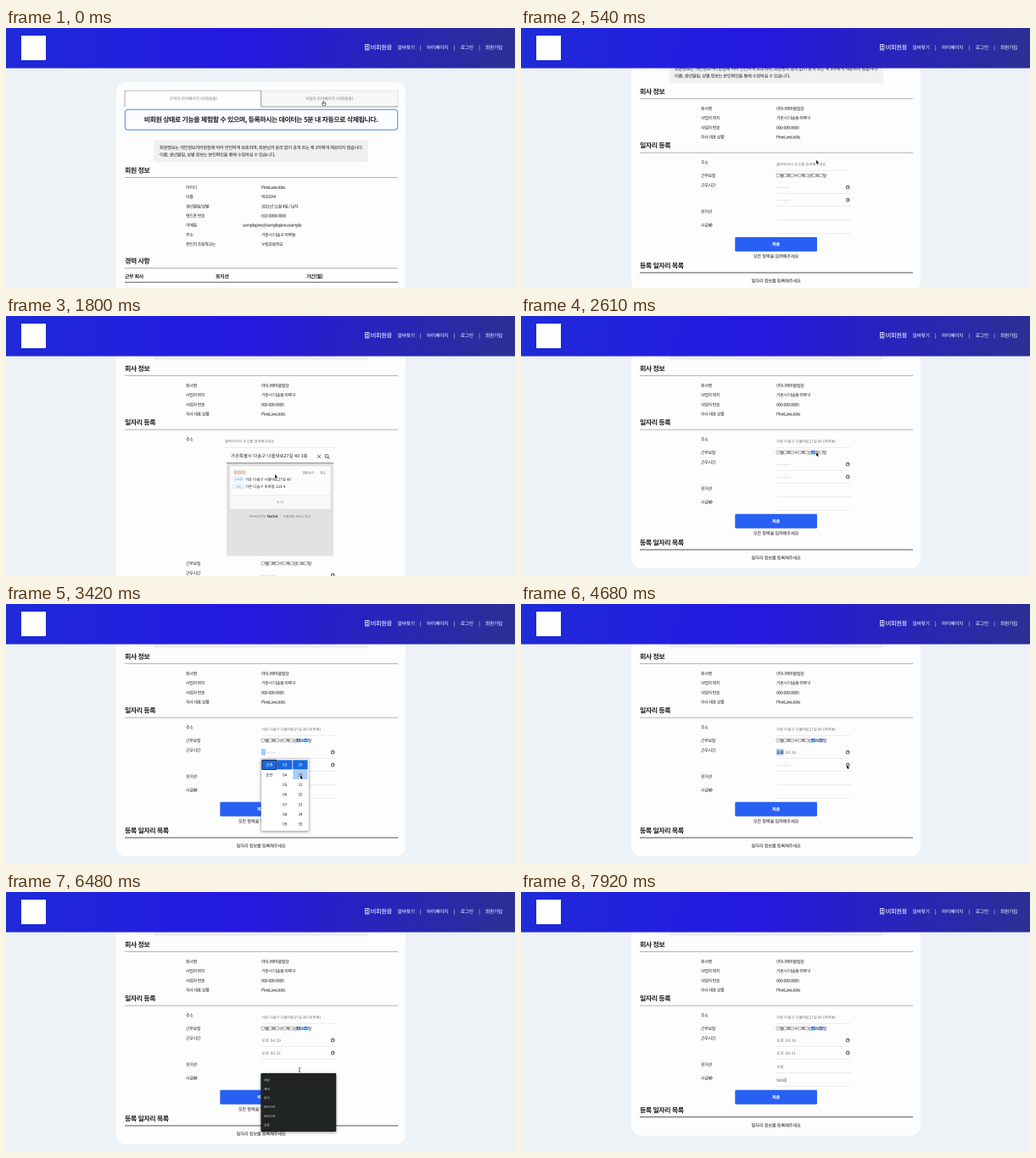
Write an HTML page with a canvas that moves like this. It is 600 px wide and 307 px high and loops after 8000 ms.

```html
<!DOCTYPE html>
<html lang="ko">
<head>
<meta charset="utf-8">
<title>마이페이지</title>
<style>
html, body { margin: 0; width: 100%; height: 100%; overflow: hidden; background: #edf2f6; }
canvas { display: block; width: 600px; height: 307px; }
</style>
</head>
<body>
<canvas id="stage"></canvas>
<script>
const W = 600, H = 307, LOOP = 8000, STEP = 90;
const canvas = document.getElementById('stage');
const ctx = canvas.getContext('2d');
const ratio = Math.max(2, window.devicePixelRatio || 1);
canvas.width = W * ratio;
canvas.height = H * ratio;

const FAMILY = '"Noto Sans CJK KR", "Noto Sans CJK", "Noto Sans", sans-serif';
const INK = '#222', SOFT = '#707070', BLUE = '#2860f4';
const MAX_SCROLL = 106;
const ADDRESS = '가온 다솜구 너울대로27길 40';

// Moments (ms) at which something in the page changes.
const AT = {
  company: 90, scroll: 225, scrolled: 710,
  search: 810, query: 1260, result: 1620, address: 2070,
  saturday: 2520, sunday: 2700,
  start: 3060, startHour: 3780, startDone: 4320,
  end: 4860, endHour: 5220, endMinute: 5580, endDone: 5850,
  position: 6300, positionDone: 6930,
  wage: 7290, firstDigit: 7470
};

// Pointer stops: time, x, y.
const POINTER = [
  [0, 374, 86.5], [180, 374, 86.5], [540, 348, 156], [760, 348, 155], [1000, 310, 165],
  [1500, 310, 165], [1800, 317, 187], [2050, 317, 189], [2430, 345, 161], [2560, 345, 161],
  [2680, 353, 161], [2780, 353, 161], [3000, 385, 175], [3120, 385, 175], [3420, 347, 202],
  [3690, 329, 202], [3900, 329, 203], [4300, 398, 215], [4680, 384, 190], [4900, 384, 190],
  [5150, 329, 240], [5300, 329, 240], [5500, 347, 228], [5650, 347, 228], [5900, 398, 215],
  [6250, 346, 207], [6480, 346, 210], [6840, 315, 222], [6960, 315, 222], [7250, 330, 222]
];

function text(s, x, y, size = 5.1, { color = INK, weight = 400, spacing = 0, align = 'left' } = {}) {
  ctx.font = `${weight} ${size}px ${FAMILY}`;
  ctx.letterSpacing = spacing + 'px';
  ctx.textRendering = 'geometricPrecision';
  ctx.textBaseline = 'middle';
  ctx.textAlign = align;
  ctx.fillStyle = color;
  ctx.fillText(s, x, y);
}

function box(x, y, w, h, fill, radius = 0, stroke, width = 0.6) {
  ctx.beginPath();
  ctx.roundRect(x, y, w, h, radius);
  if (fill) { ctx.fillStyle = fill; ctx.fill(); }
  if (stroke) { ctx.strokeStyle = stroke; ctx.lineWidth = width; ctx.stroke(); }
}

function path(points, color, width = 0.6) {
  ctx.beginPath();
  points.forEach(([x, y]) => ctx.lineTo(x, y));
  ctx.strokeStyle = color;
  ctx.lineWidth = width;
  ctx.stroke();
}

function circle(x, y, r, color, width = 0.7) {
  ctx.beginPath();
  ctx.arc(x, y, r, 0, 7);
  ctx.strokeStyle = color;
  ctx.lineWidth = width;
  ctx.stroke();
}

const rule = (y, color = '#999', width = 0.8, x1 = 140, x2 = 462) =>
  path([[x1, y], [x2, y]], color, width);
const cell = (s, x, y) => text(s, x, y, 5.1, { spacing: -0.45 });
const note = (s, y) => text(s, 300.5, y, 5.36, { spacing: -0.3, align: 'center' });
const strong = (s, x, y, size = 8, align = 'left') =>
  text(s, x, y, size, { weight: 700, spacing: -size * 0.06, align });

function section(title, y) {
  strong(title, 140, y);
  rule(y + 8.6);
}

function rows(list, y) {
  list.forEach(([label, value, x = 301], i) => {
    cell(label, 212, y + i * 11.2);
    cell(value, x, y + i * 11.2);
  });
}

function pointerAt(t) {
  const i = POINTER.findIndex(stop => stop[0] > t);
  if (i < 0) return POINTER[POINTER.length - 1].slice(1);
  const [t0, x0, y0] = POINTER[i - 1], [t1, x1, y1] = POINTER[i];
  const u = (t - t0) / (t1 - t0), k = u * u * (3 - 2 * u);
  return [x0 + (x1 - x0) * k, y0 + (y1 - y0) * k];
}

function header() {
  const g = ctx.createLinearGradient(0, 0, W, 60);
  g.addColorStop(0, '#1f2bd8');
  g.addColorStop(0.45, '#2419e2');
  g.addColorStop(1, '#2b3194');
  ctx.fillStyle = g;
  ctx.fillRect(0, 0, W, 47.5);
  box(18, 9, 29, 29, '#fff');
  const white = { color: '#fff', weight: 500, spacing: -0.3 };
  box(423.4, 19.4, 4.6, 6.6, null, 0.6, '#fff', 0.7);
  circle(425.7, 21.8, 0.8, '#fff');
  path([[424.4, 24.4], [427, 24.4]], '#fff', 0.8);
  text('비회원용', 429.7, 22.7, 7.2, white);
  [['알바찾기', 461.5], ['|', 488], ['마이페이지', 496], ['|', 527.5],
   ['로그인', 535.7], ['|', 557.3], ['회원가입', 565]].forEach(([s, x]) => text(s, x, 22.8, 5.8, white));
}

// Tabs, banner and privacy notice shared by both pages.
function pageTop(company) {
  const active = company ? 301 : 140, other = company ? 140 : 301;
  box(other, 74, 161, 19, '#f6f7f7', 0, '#ccc');
  box(active, 74, 161, 19, '#fdfdfd');
  path([[active, 93], [active, 74], [active + 160.5, 74], [active + 160.5, 93]], '#777');
  path([[other, 93], [other + 161, 93]], '#888', 0.8);
  const tab = { color: '#777', align: 'center' };
  text('구직자 마이페이지 (비회원용)', 221, 83, 4.6, tab);
  text('사업자 마이페이지 (비회원용)', 381, 83, 4.6, tab);
  box(140.3, 96.3, 321.4, 24, '#fafcff', 3.5, '#4a86e8', 1);
  strong('비회원 상태로 기능을 체험할 수 있으며, 등록하시는 데이터는 5분 내 자동으로 삭제됩니다.', 300.5, 108, 8, 'center');
  box(174.5, 132, 252.5, 26.2, '#f0f0f0');
  const info = { spacing: -0.3 };
  text('회원정보는 개인정보처리방침에 따라 안전하게 보호되며, 회원님의 동의 없이 공개 또는 제 3자에게 제공되지 않습니다.', 181, 141, 5.3, info);
  text('이름, 생년월일, 성별 정보는 본인확인을 통해 수정하실 수 있습니다.', 181, 149.3, 5.3, info);
}

function memberPage() {
  box(130, 64, 341, 300, '#fdfdfd', 12);
  pageTop(false);
  section('회원 정보', 168);
  rows([
    ['아이디', 'PineLaneJobs'], ['이름', '박모모씨'], ['생년월일/성별', '2021년 11월 4일 / 남자'],
    ['핸드폰 번호', '010-0000-0000'], ['이메일', 'samplepine@samplepine.example', 279],
    ['주소', '가온시 다솜구 마루동'], ['본인의 초등학교는', '누빔초등학교']
  ], 188);
  section('경력 사항', 275);
  ['근무 회사', '포지션', '기간(월)'].forEach((s, i) => strong(s, 140 + 107 * i, 293, 6));
  rule(300.2, '#444', 0.9);
  cell('나래식당', 140, 309);
  cell('서빙', 247, 309);
}

function checkbox(x, y, checked) {
  box(x, y - 1.9, 3.8, 3.8, checked ? '#1371ea' : '#fff', 0.6, checked ? '#1371ea' : '#666', 0.5);
  if (checked) path([[x + 0.8, y], [x + 1.6, y + 0.9], [x + 3, y - 1]], '#fff', 0.7);
}

function timeField(y, value, focused) {
  if (focused) box(300.8, y - 4, value ? 8.6 : 5.2, 7.6, '#a9cdf8');
  text(value || '-- --:--', 301.3, y, 4.6, { color: focused && !value ? '#2b6fd6' : SOFT, spacing: value ? 0.2 : 0.6 });
  if (focused && value) text('오후', 301.3, y, 4.6, { spacing: 0.2 });
  circle(385.2, y, 1.9, '#222');
  path([[385.2, y - 1.2], [385.2, y], [386.2, y + 0.4]], '#222', 0.5);
  rule(y + 7.2, '#e2e2e2', 0.6, 301, 389);
}

function popup(x, y, w, h, fill, radius) {
  ctx.save();
  ctx.shadowColor = 'rgba(0,0,0,.4)';
  ctx.shadowBlur = 3 * ratio;
  ctx.shadowOffsetY = ratio;
  box(x, y, w, h, fill, radius);
  ctx.restore();
}

function timePicker(y, hour, minute, [px, py]) {
  const rowHeight = 11.65, two = n => String(n).padStart(2, '0');
  popup(300.7, y, 56.4, 85.5, '#fff', 1);
  box(300.7, y, 56.4, 85.5, null, 1, '#aaa', 0.4);
  [[301.8, ['오후', '오전']],
   [320, Array.from({ length: 7 }, (_, i) => two((hour + i - 1) % 12 + 1))],
   [338.2, Array.from({ length: 7 }, (_, i) => two((minute + i) % 60))]].forEach(([x, items], column) => {
    items.forEach((s, i) => {
      const top = y + 1.7 + i * rowHeight;
      const hover = px >= x && px < x + 17.5 && py >= top && py < top + rowHeight;
      if (i === 0) box(x, top, 17.4, 11.2, '#1a67e0', 0.8, column === 0 ? '#111' : null, 0.9);
      else if (hover) box(x, top, 17.4, 11.2, '#a9cdf8', 0.8);
      text(s, x + 8.7, top + 5.7, 4.6, { color: i ? INK : '#fff', align: 'center', weight: i ? 400 : 500 });
    });
  });
}

function addressSearch(t) {
  box(260, 156, 126, 127.5, '#e0e3e1');
  box(260, 156, 126, 17.5, '#fdfdfd');
  rule(173.7, '#777', 0.8, 260, 386);
  if (t >= AT.query) {
    text('가온특별시 다솜구 너울대로27길 40 3층', 265, 165, 5.4);
    path([[367, 163.8], [371, 167.8]], '#444');
    path([[371, 163.8], [367, 167.8]], '#444');
  }
  circle(378, 165.3, 2, '#333');
  path([[379.5, 166.8], [381.2, 168.5]], '#333', 0.8);
  if (t >= AT.result) {
    box(263.8, 177, 119, 51, '#fcfcfb', 0, '#d2d5d3', 0.4);
    box(268, 181.5, 15, 6.2, '#f3efe8');
    text('00000', 268.5, 184.6, 5, { color: '#df7256' });
    text('영문보기', 349.5, 185.2, 3.8, { color: '#555' });
    text('|', 366.5, 185, 3.4, { color: '#ccc' });
    text('지도', 370, 185.2, 3.8, { color: '#555' });
    [['도로명', ADDRESS, 192.6], ['지번', '가온 다솜구 마루동 123-4', 201.5]].forEach(([kind, place, y]) => {
      box(267.8, y - 2.7, 12.6, 5.6, '#f0f6fd', 0.6, '#c8dcf2', 0.4);
      text(kind, 274.1, y + 0.1, 3.2, { color: '#338be0', align: 'center' });
      text(place, 282, y, 4.4);
    });
    box(264, 211.3, 118.6, 16.5, '#f7f8f7');
    rule(211.3, '#e2e4e3', 0.5, 264, 382.6);
    text('1 / 1', 323.2, 219.4, 4, { color: '#444', align: 'center' });
  }
  text('Powered by', 287, 236.4, 3.5, { color: '#666' });
  text('torvo', 308, 236.2, 4.6, { weight: 700, color: '#333' });
  text('|', 323, 236.2, 3.4, { color: '#bbb' });
  text('우편번호 서비스 안내', 327, 236.4, 3.6, { color: '#666' });
}

function form(t, pointer) {
  cell('근무요일', 212, 161);
  [...'월화수목금토일'].forEach((day, i) => {
    const x = 301 + i * 8.43;
    checkbox(x, 161, i === 5 && t >= AT.saturday || i === 6 && t >= AT.sunday);
    text(day, x + 4, 161, 5);
  });
  cell('근무시간', 212, 172.5);
  timeField(175, t >= AT.startHour && '오후 04:29', t >= AT.start && t < AT.end);
  timeField(190, t >= AT.endHour && (t >= AT.endMinute ? '오후 06:31' : '오후 06:29'), t >= AT.end && t < AT.position);
  cell('포지션', 212, 203.6);
  if (t >= AT.positionDone) text('서빙', 301.3, 206, 4.6, { color: SOFT });
  rule(213.4, '#e2e2e2', 0.6, 301, 389);
  cell('시급(₩)', 212, 219.5);
  const wage = t < AT.firstDigit ? '' : '9000'.slice(0, 1 + Math.floor((t - AT.firstDigit) / STEP));
  text(wage, 301.3, 222, 4.6, { color: '#555' });
  if (t >= AT.wage) {
    const x = 301.8 + ctx.measureText(wage).width;
    path([[x, 219.4], [x, 224.6]], '#222', 0.5);
  }
  rule(229.5, '#e2e2e2', 0.6, 301, 389);
  box(252.3, 233.8, 96.7, 17, BLUE, 1.5);
  text('제출', 300.6, 242.3, 5, { color: '#fff', weight: 700, align: 'center' });

  const lift = wage ? 10.2 : 0;
  if (!wage) note('모든 항목을 입력해주세요', 256.3);
  strong('등록 일자리 목록', 140, 267.5 - lift);
  rule(275.9 - lift, '#666', 1.1);
  note('일자리 정보를 등록해주세요', 285.6 - lift);

  if (t >= AT.start && t < AT.startDone) timePicker(182.5, t < AT.startHour ? 3 : 4, 29, pointer);
  if (t >= AT.end && t < AT.endDone) timePicker(197.5, t < AT.endHour ? 3 : 6, t < AT.endMinute ? 29 : 31, pointer);
  if (t >= AT.position && t < AT.positionDone) {
    popup(300.4, 214, 88.8, 69, '#202423', 1);
    ['서빙', '캐셔', '관리', '바리스타', '브리스타', '포장'].forEach((s, i) => {
      const y = 222 + i * 10.6;
      if (Math.abs(pointer[1] - y) < 5.3) box(300.4, y - 5.3, 88.8, 10.6, '#3a3f3e');
      text(s, 304, y, 3.7, { color: '#eee' });
    });
  }
}

function companyPage(t, pointer) {
  const u = Math.min(1, Math.max(0, (t - AT.scroll) / (AT.scrolled - AT.scroll)));
  const scroll = MAX_SCROLL * (1 - (1 - u) ** 2);
  const searching = t >= AT.search && t < AT.address;
  const shift = searching ? 131 : 0;
  const bottom = 298 + shift - (t >= AT.firstDigit ? 10.2 : 0);
  ctx.save();
  ctx.translate(0, -scroll);
  box(130, 64, 341, bottom + MAX_SCROLL - 64, '#fdfdfd', 12);
  pageTop(true);
  ctx.translate(0, MAX_SCROLL);
  section('회사 정보', 62);
  rows([
    ['회사명', '(주)나래마을일감'], ['사업자 위치', '가온시 다솜동 마루구'],
    ['사업자 번호', '000-000-0000'], ['자사 대표 상품', 'PineLaneJobs']
  ], 82);
  section('일자리 등록', 125.5);
  cell('주소', 212, 145.6);
  const left = searching ? 258 : 301;
  rule(155.2, '#e2e2e2', 0.6, left, 389);
  if (t >= AT.address) text(ADDRESS + ' (마루동)', left, 148, 4.4, { color: SOFT });
  else text('클릭하셔서 주소를 검색해주세요', left, 147.8, 4.35, { color: '#777' });
  if (searching) addressSearch(t);
  ctx.translate(0, shift);
  form(t, pointer);
  ctx.restore();
}

function drawPointer(t, [x, y]) {
  ctx.save();
  ctx.translate(x, y);
  ctx.lineJoin = 'round';
  if (t < 270) {
    box(-1.2, 1.6, 4, 3.4, '#fff', 1.2, '#222', 0.6);
    box(-0.7, -0.3, 1.2, 3.4, '#fff', 0.6, '#222', 0.5);
  } else if (t >= 6160 && t < 6600 || t >= 7100) {
    path([[-1, -2.4], [1, -2.4]], '#222', 0.5);
    path([[0, -2.4], [0, 2.4]], '#222', 0.7);
    path([[-1, 2.4], [1, 2.4]], '#222', 0.5);
  } else {
    ctx.beginPath();
    [[0, 0], [0, 4.4], [1, 3.5], [1.8, 5.2], [2.6, 4.8], [1.9, 3.2], [3.2, 3.2]]
      .forEach(([px, py]) => ctx.lineTo(px, py));
    ctx.closePath();
    ctx.strokeStyle = '#fff';
    ctx.lineWidth = 0.9;
    ctx.stroke();
    ctx.fillStyle = '#111';
    ctx.fill();
  }
  ctx.restore();
}

function draw(now) {
  const t = Math.floor(now % LOOP / STEP) * STEP;
  const pointer = pointerAt(t);
  ctx.setTransform(ratio, 0, 0, ratio, 0, 0);
  ctx.fillStyle = '#edf2f6';
  ctx.fillRect(0, 0, W, H);
  if (t < AT.company) memberPage();
  else companyPage(t, pointer);
  header();
  if (t < AT.firstDigit) drawPointer(t, pointer);
}

let begin;
function tick(now) {
  begin ??= now;
  draw(now - begin);
  requestAnimationFrame(tick);
}
requestAnimationFrame(tick);
</script>
</body>
</html>
```
